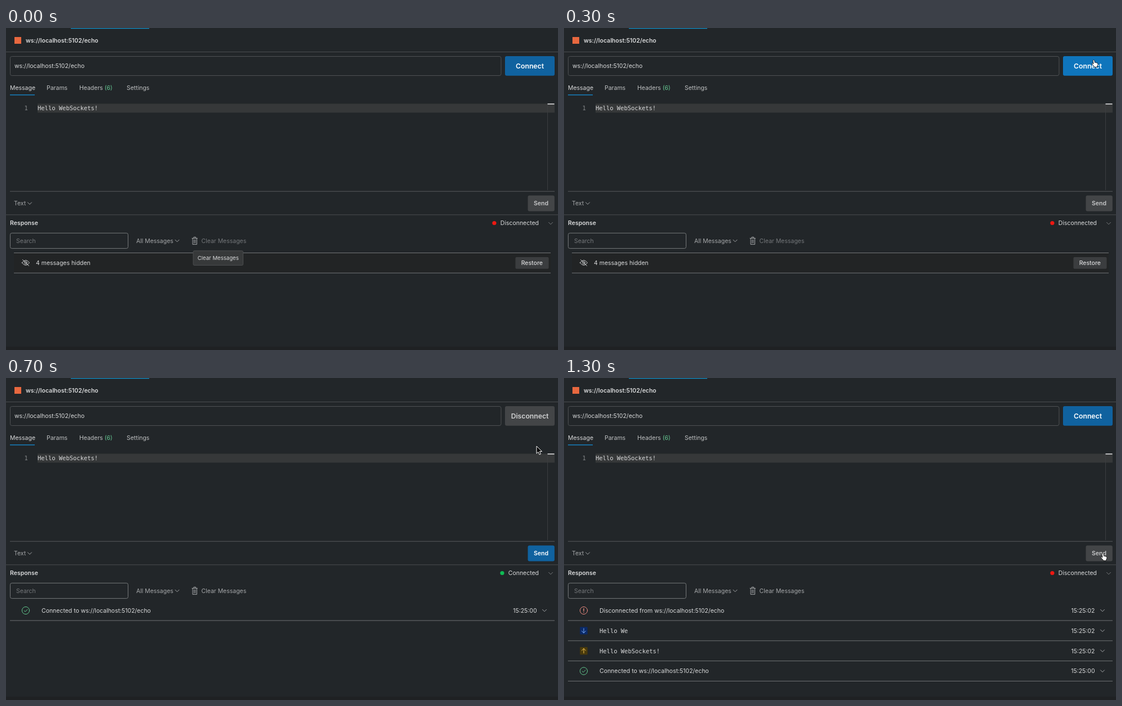
Animation, 979 px wide and 572 px high, one loop 2.27 s. Source, as an HTML page:

```html
<!DOCTYPE html>
<html lang="en">
<head>
<meta charset="utf-8">
<title>WebSocket echo</title>
<style>
html, body { margin: 0; height: 100%; overflow: hidden; background: #222629; }
svg { display: block; width: 100vw; height: 100vh; }
text { font: 10.48px Inter, sans-serif; fill: #d9dadb; }
.mono { font-family: "DejaVu Sans Mono", monospace; }
.bold { font-weight: 600; }
.big { font-size: 12.2px; }
.tip { font-size: 9.6px; }
.dim { fill: #a5a7a9; }
.faint { fill: #74777a; }
.mid { text-anchor: middle; }
.end { text-anchor: end; }
.line { fill: none; stroke: #a5a7a9; stroke-linecap: round; stroke-linejoin: round; }
</style>
</head>
<body>
<svg viewBox="0 0 979 572">
  <defs>
    <path id="chev" class="line" d="M-3.5-1.7 0 1.8 3.5-1.7"/>
    <g id="ok" class="line" style="stroke:#62c98f">
      <circle r="6.6"/><path d="m-2.9 .2 2 2 3.9-4"/>
    </g>
    <g id="alert" class="line" style="stroke:#ec8b80">
      <circle r="6.6"/><path d="M0-3.4V.7M0 3v.2" stroke-width="1.4"/>
    </g>
    <g id="down">
      <rect x="-6.7" y="-6.7" width="13.4" height="13.4" rx="1" fill="#0b2a68"/>
      <path class="line" style="stroke:#78a8f5" d="M0-4V4M-3.5 .6 0 4 3.5 .6"/>
    </g>
    <g id="up">
      <rect x="-6.7" y="-6.7" width="13.4" height="13.4" rx="1" fill="#493a0c"/>
      <path class="line" style="stroke:#f5c451" d="M0 4V-4M-3.5-.6 0-4 3.5-.6"/>
    </g>
  </defs>

  <rect width="979" height="572" fill="#222629"/>
  <rect y="566" width="979" height="6" fill="#1f2123"/>
  <rect x="115" width="139" height="1.3" fill="#118dc4"/>
  <rect x="15" y="16" width="12" height="12" fill="#e8683f"/>
  <text class="bold" x="35" y="25.5">ws://localhost:5102/echo</text>
  <path d="M0 42.5H979M0 331.8H979" stroke="#4b4e50"/>
  <rect x="7.5" y="50.5" width="870.5" height="34" rx="3" fill="none" stroke="#4e5153"/>
  <text x="15" y="71.4">ws://localhost:5102/echo</text>
  <rect id="connect" x="885" y="50" width="88" height="34.8" rx="3"/>
  <text id="connectText" class="bold big mid" x="929" y="72"></text>

  <text x="7" y="109.8">Message</text>
  <rect x="7" y="118" width="44" height="1.6" fill="#1779b4"/>
  <text x="72" y="109.8" class="dim" style="fill:#bfc1c2">Params</text>
  <text x="130" y="109.8" style="fill:#bfc1c2">Headers <tspan fill="#65c792">(6)</tspan></text>
  <text x="214" y="109.8" style="fill:#bfc1c2">Settings</text>

  <rect x="56" y="134.5" width="917" height="15.8" fill="#363839"/>
  <path d="M960.5 134V288" stroke="#3b3e40"/>
  <rect x="960.5" y="134" width="12" height="2" fill="#b9babb"/>
  <text class="mono" x="32.5" y="145.8" style="fill:#85888a">1</text>
  <text class="mono" x="56" y="145.8">Hello WebSockets!</text>
  <path d="M7 290.2H973" stroke="#585b5d"/>
  <text class="dim" x="14" y="315.3">Text</text>
  <use href="#chev" x="42" y="311.5"/>
  <rect id="send" x="925.5" y="297.5" width="47.3" height="28" rx="3"/>
  <text id="sendText" class="bold mid" x="949" y="315.3">Send</text>

  <text class="bold" x="7" y="350">Response</text>
  <circle id="dot" cy="346.5" r="3.6"/>
  <text id="status" class="end" x="945" y="350.3"></text>
  <use href="#chev" x="966" y="347" opacity=".65"/>
  <rect x="7.5" y="364.3" width="209" height="27.3" rx="3" fill="none" stroke="#75787a"/>
  <text class="faint" x="18" y="381.8">Search</text>
  <text class="dim" x="231" y="381.8">All Messages</text>
  <use href="#chev" x="303.5" y="378"/>
  <path class="line" d="M330 373.5h9.4M333 373.3v-1.9h3.6v1.9M331 373.8v10.6h7.4v-10.6M333.6 376v6M335.9 376v6"/>
  <text id="clear" x="346.5" y="381.8">Clear Messages</text>

  <g id="banner">
    <rect x="14" y="400" width="952" height="35" fill="#222425"/>
    <path d="M14 399.5H966M14 435.2H966" stroke="#727577"/>
    <g class="line" style="stroke:#d0d1d2">
      <path d="M28.5 417q6.5-9 13 0q-6.5 9-13 0ZM29.5 411.5l11 11"/>
      <circle cx="35" cy="417" r="2.2"/>
    </g>
    <text x="53" y="421.2">4 messages hidden</text>
    <rect x="903.5" y="407" width="59" height="20.8" rx="2" fill="#3b3d3f"/>
    <text class="mid" x="932.8" y="421.2" style="font-weight:500">Restore</text>
  </g>
  <g id="tooltip">
    <rect x="332" y="395.8" width="88.5" height="25.7" rx="2" fill="#37393a" stroke="#4b4d4f"/>
    <text class="tip mid" x="376.2" y="412">Clear Messages</text>
  </g>
  <g id="log"></g>

  <path id="arrow" d="M0 0V13.2L3 10.4 5 15 7.4 14 5.4 9.5H9.6Z" fill="#000" stroke="#fff"/>
  <path id="hand" fill="#fff" stroke="#000" stroke-width=".8" d="M3.5.8C4.4.8 4.8 1.4 4.9 2.2L5.4 5.4C5.9 4.9 7 5 7.2 5.7 7.8 5.3 8.8 5.5 9 6.3 9.7 6 10.7 6.4 10.8 7.3 11 9.1 10.6 10.5 9.6 11.9V13.5H4.6L4.3 12.3C3.2 11.2 1.6 9.5.5 7.9-.1 6.9 1.1 6.1 2.1 6.9L3.1 7.8 2.1 2.5C1.9 1.5 2.6.8 3.5.8Z"/>
</svg>
<script>
const LOOP = 2270, STEP = 100, BLUE = '#10629f', HOVER = '#0f75bc', GREY = '#434547';
const $ = id => document.getElementById(id);
const show = (id, on) => $(id).style.display = on ? '' : 'none';
const url = 'ws://localhost:5102/echo';
const opened = ['ok', 'Connected to ' + url, '15:25:00'];
const history = [
  ['alert', 'Disconnected from ' + url, '15:25:02'],
  ['down', 'Hello We', '15:25:02', 'mono'],
  ['up', 'Hello WebSockets!', '15:25:02', 'mono'],
  opened
];

// Pointer path: [time, x, y]
const path = [
  [200, 940.5, 39], [300, 936, 56], [400, 931.5, 70], [500, 929.5, 75], [600, 929.5, 75],
  [700, 941, 121], [800, 961, 228], [900, 972.5, 298], [1000, 959, 307], [1100, 952, 311]
];

function row([icon, label, time, font = ''], i) {
  const y = 413 + i * 35.85;
  return `<use href="#${icon}" x="35" y="${y}"/>
    <text class="${font}" x="63" y="${y + 3.8}">${label}</text>
    <text class="end" x="941.5" y="${y + 3.8}">${time}</text>
    <use href="#chev" x="955" y="${y}" style="--c:#ccc"/>
    <path d="M7 ${y + 17.9}H973" stroke="#6e7173"/>`;
}

function drawPointer(t) {
  const spot = path.filter(p => p[0] <= t).pop();
  const hand = t >= 300 && t < 700 || t >= 1000;
  show('arrow', spot && !hand);
  show('hand', spot && hand);
  if (spot) $(hand ? 'hand' : 'arrow').setAttribute('transform', `translate(${spot[1]} ${spot[2]})`);
}

let last = -1;
function draw(now) {
  requestAnimationFrame(draw);
  const t = Math.floor(now % LOOP / STEP) * STEP;
  if (t === last) return;
  last = t;
  const online = t >= 600 && t < 1300;
  const rows = t < 600 ? [] : online ? [opened] : history;

  $('connect').setAttribute('fill', online ? GREY : t >= 300 && t < 600 ? HOVER : BLUE);
  $('connectText').textContent = online ? 'Disconnect' : 'Connect';
  $('connectText').style.fill = online ? '#d0d1d2' : '#fff';
  $('send').setAttribute('fill', !online ? GREY : t >= 1000 ? HOVER : BLUE);
  $('sendText').style.fill = online ? '#fff' : '#c8c9ca';
  $('dot').setAttribute('cx', online ? 880 : 866);
  $('dot').setAttribute('fill', online ? '#0fbb54' : '#ee1812');
  $('status').textContent = online ? 'Connected' : 'Disconnected';
  $('clear').style.fill = t < 600 ? '#74777a' : '#a5a7a9';
  show('banner', t < 600);
  show('tooltip', t < 100);
  $('log').innerHTML = rows.map(row).join('');
  drawPointer(t);
}
draw(performance.now());
</script>
</body>
</html>
```
